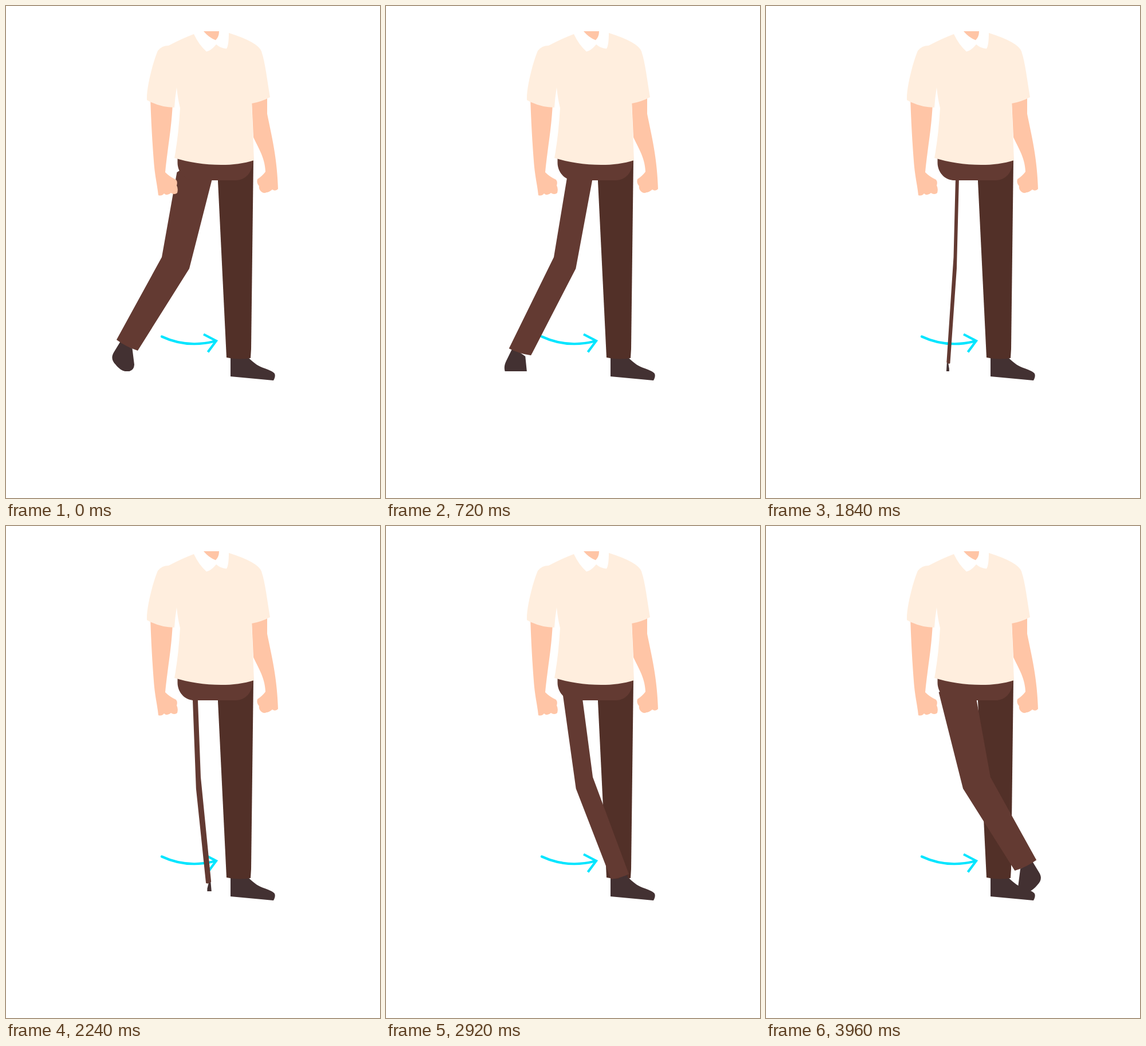
Recreate the animation shown at these times as an HTML page. Size 653 by 858 pixels, loop 4 s.

```html
<!DOCTYPE html>
<html lang="en">
<head>
<meta charset="utf-8">
<title>Leg swing</title>
<style>
  html, body { margin: 0; width: 100%; height: 100%; overflow: hidden; background: #fff; }
  svg { display: block; width: 100%; height: 100%; }
  .skin { fill: #ffc5a6; }
  .shirt { fill: #ffeede; }
  .near { fill: #633a32; }
  .far { fill: #523028; }
  .shoe { fill: #433132; }
  .arrow { fill: none; stroke: #00e5ff; stroke-width: 4.2; }
</style>
</head>
<body>
<svg viewBox="0 0 653 858">
  <clipPath id="floor"><rect x="0" y="560" width="653" height="77"/></clipPath>

  <path class="arrow" d="M272 576.5Q316 597 365 584.5" stroke-linecap="round"/>
  <path class="arrow" d="M345 572.5L367 584L352.5 603.5"/>

  <!-- standing leg -->
  <path class="shoe" d="M392 612H422C434 624 442 629 452 632Q466 637 469 641Q471 646 467 653L392 646Z"/>
  <path class="far" d="M369 285L385 613Q406 617.5 427 614L428 598L432 269Z"/>

  <!-- swinging leg -->
  <g clip-path="url(#floor)"><path id="foot" class="shoe"/></g>
  <path id="leg" class="near"/>

  <path class="near" d="M299.5 262V273C299.5 290 312 304 329 304H401C418 304 431 290 431 269V262Z"/>

  <!-- arms -->
  <path class="skin" d="M252 160L291 170C289 215 281 255 278 290Q286 298 297 303Q300 307 298 313Q301 318 299 326Q294 330 288 326Q281 332 276 327Q272 332 266 330C264 310 260 298 258 270Q254 220 252 160Z"/>
  <path class="skin" d="M429 165L456 158V188C464 228 473 262 475 319Q470 324 465 320Q459 325 455 325Q449 328 444 322Q441 318 442 314Q437 309 439 302Q447 297 453 289C452 266 443 252 432 229Z"/>

  <!-- shirt -->
  <path class="shirt" d="M328 49Q309 56 284 69Q272 69 265 78C256 100 245 142 246 164Q269 177 294 177Q295 160 298 142Q300 162 304 178Q301 228 294 265C334 277 390 283 433 269L429 170Q446 167 461 159C456 130 453 100 446 79Q440 63 389 47Z"/>
  <path fill="#fff" d="M328 40V49Q337 68 350 79.500Q358 78 367 67Q375 74 385 74.500Q389 69 389 47V40Z"/>
  <path class="skin" d="M345 44H372Q372 54 366 59.500Q354 55 345 44Z"/>
</svg>
<script>
const LOOP = 4000, STEP = 40, AXIS = 332.5;
const leg = document.getElementById('leg');
const foot = document.getElementById('foot');

const odd = (v, a, b) => v * (a + b * v * v);
const even = (v, a, b) => v * v * (a + b * v * v);
const pt = (x, y) => x.toFixed(2) + ' ' + y.toFixed(2);

// v runs from 1 (leg behind) to -1 (leg in front); half widths change sign at the turn
function pose(v) {
  const tilt = 9.5 * Math.abs(v);
  const hip = { x: AXIS - odd(v, -17, 22) , w: odd(v, 37, -5.5) };
  const knee = { x: AXIS - 36.5 * odd(v, .78, .22), w: 24 * odd(v, 1.42, -.42) };
  const ankle = { x: AXIS - odd(v, 177, -56), y: 622.5 - even(v, 58, -27), w: odd(v, 38, -19.5) };

  const back = { hip: hip.x - hip.w, knee: knee.x - knee.w };
  const front = { hip: hip.x + hip.w, knee: knee.x + knee.w };
  const topOf = s => s.hip + (s.hip - s.knee) * .1;

  leg.setAttribute('d',
    'M' + pt(topOf(back), 290) +
    'L' + pt(back.knee, 438) +
    'L' + pt(ankle.x - ankle.w, ankle.y - tilt) +
    'Q' + pt(ankle.x - tilt * .2 * Math.sign(v), ankle.y + 3) + ' ' + pt(ankle.x + ankle.w, ankle.y + tilt) +
    'L' + pt(front.knee, 458) +
    'L' + pt(topOf(front), 290) +
    'Q' + pt(hip.x, 270) + ' ' + pt(topOf(back), 290) + 'Z');

  const sx = ankle.w / 18.5, sy = 1 + .8 * (1 - Math.abs(v));
  const p = (x, y) => pt(ankle.x + x * sx, ankle.y + y * sy) + ' ';
  foot.setAttribute('d',
    'M' + p(-12, -6) + 'L' + p(-23, 12) +
    'C' + p(-28, 20) + p(-27, 27) + p(-20, 34) +
    'C' + p(-12, 44) + p(-4, 47) + p(4, 45.5) +
    'Q' + p(12, 43) + p(12.5, 34) + 'L' + p(9, 6) + 'Z');
}

function frame(now) {
  const t = Math.floor(now % LOOP / STEP) * STEP;
  pose(1 - t / (LOOP / 2));
  requestAnimationFrame(frame);
}
pose(1);
requestAnimationFrame(frame);
</script>
</body>
</html>
```
